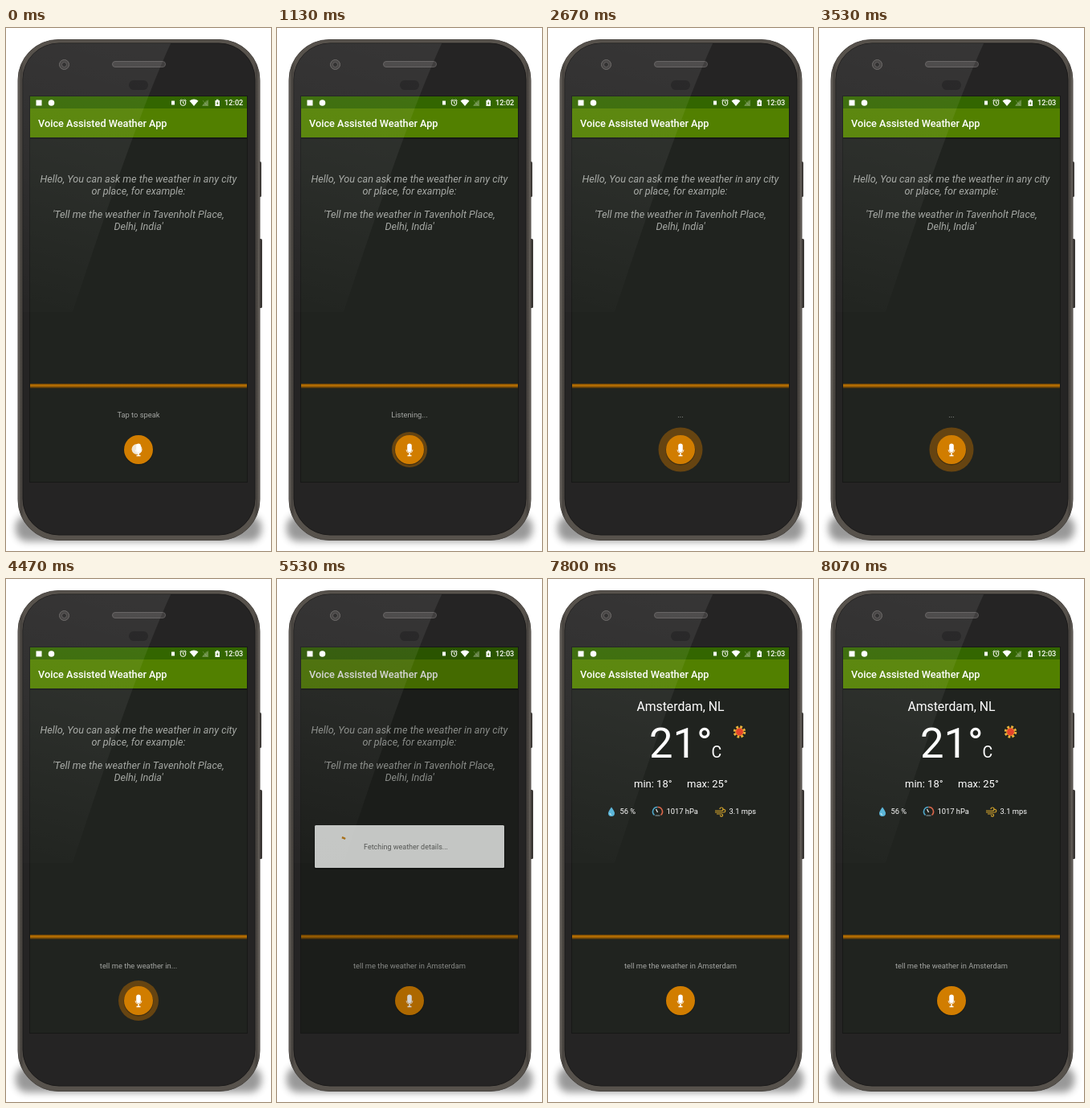
Recreate the animation shown at these times as an HTML page. Size 330 by 650 pixels, loop 8270 ms.

```html
<!DOCTYPE html>
<html lang="en">
<head>
<meta charset="utf-8">
<title>Voice weather demo</title>
<style>
html, body { margin: 0; width: 100%; height: 100%; overflow: hidden; background: #fff; }
svg { display: block; font-family: Roboto, "Noto Sans", sans-serif; }
.mid { text-anchor: middle; }
.small { font-size: 9.35px; }
</style>
</head>
<body>
<svg width="330" height="650" viewBox="0 0 330 650">
  <defs>
    <linearGradient id="rim" x1="0" y1="0" x2="1" y2="0">
      <stop offset="0" stop-color="#726d66"/><stop offset=".012" stop-color="#45413d"/>
      <stop offset=".025" stop-color="#57524c"/><stop offset=".975" stop-color="#57524c"/>
      <stop offset=".988" stop-color="#45413d"/><stop offset="1" stop-color="#726d66"/>
    </linearGradient>
    <linearGradient id="glare" gradientUnits="userSpaceOnUse" x1="150" y1="15" x2="60" y2="350">
      <stop offset="0" stop-color="#fff" stop-opacity=".08"/>
      <stop offset=".45" stop-color="#fff" stop-opacity=".055"/>
      <stop offset="1" stop-color="#fff" stop-opacity=".01"/>
    </linearGradient>
    <linearGradient id="line" x1="0" y1="0" x2="0" y2="1">
      <stop offset="0" stop-color="#5a3a0a"/><stop offset=".35" stop-color="#c47700"/>
      <stop offset=".65" stop-color="#8a5507"/><stop offset="1" stop-color="#252215"/>
    </linearGradient>
    <filter id="soft" x="-10%" y="-50%" width="120%" height="200%"><feGaussianBlur stdDeviation="5"/></filter>
    <clipPath id="face"><rect x="21" y="19" width="289" height="611" rx="45"/></clipPath>
  </defs>

  <!-- phone -->
  <rect x="12" y="606" width="306" height="32" rx="14" opacity=".4" filter="url(#soft)"/>
  <rect x="313" y="166" width="5" height="44" rx="1.5" fill="#3a3734"/>
  <rect x="313" y="262" width="6" height="86" rx="1.5" fill="#3a3734"/>
  <rect x="15" y="14.500" width="301" height="622" rx="50" fill="url(#rim)" stroke="#4a4642"/>
  <rect x="21" y="19" width="289" height="611" rx="45" fill="#252424" stroke="#1b1a1a"/>
  <rect x="132.500" y="41.500" width="66" height="7" rx="3.500" fill="#403e3e" stroke="#5c5959"/>
  <circle cx="72.500" cy="45.500" r="6" fill="#3b3938" stroke="#656261"/>
  <circle cx="72.500" cy="45.500" r="3" fill="#232222" stroke="#575454"/>
  <rect x="153" y="65" width="24" height="12" rx="6" fill="#191819"/>

  <!-- app -->
  <rect x="29" y="84" width="272" height="481" fill="#171817"/>
  <rect x="30" y="85" width="270" height="479" fill="#20231f"/>
  <rect x="30" y="85" width="270" height="15" fill="#336600"/>
  <rect x="30" y="100" width="270" height="36" fill="#528000"/>
  <rect x="30" y="136" width="270" height="2" fill="#151815"/>
  <text x="40" y="123" fill="#fff" font-size="12.7" font-weight="500">Voice Assisted Weather App</text>

  <g id="hello" class="mid" fill="#a5a8a4" font-size="12.65" font-style="italic">
    <text x="165" y="192">Hello, You can ask me the weather in any city</text>
    <text x="165" y="206.500">or place, for example:</text>
    <text x="165" y="236">'Tell me the weather in Tavenholt Place,</text>
    <text x="165" y="250.500">Delhi, India'</text>
  </g>

  <g id="result" fill="#fff">
    <text class="mid" x="165" y="163.500" font-size="15.8">Amsterdam, NL</text>
    <text x="126" y="222" font-size="52.600">21°</text>
    <text x="203.500" y="222" font-size="19.500">C</text>
    <text x="107" y="259" font-size="13">min: 18°</text>
    <text x="173" y="259" font-size="13">max: 25°</text>
    <text class="small" x="89.500" y="292">56 %</text>
    <text class="small" x="147.500" y="292">1017 hPa</text>
    <text class="small" x="225.500" y="292">3.1 mps</text>
    <circle cx="238.500" cy="190" r="6" fill="none" stroke="#e9b43b" stroke-width="3.500" stroke-dasharray="2.6 2.110"/>
    <circle cx="238.500" cy="190" r="4.800" fill="#e3432c" stroke="#ef8a2e"/>
    <path d="M79 283.500Q75 289 75 291A4 4 0 0 0 83 291Q83 289 79 283.500Z" fill="#58b4d8"/>
    <path d="M77 291a2 2 0 0 0 2 2" fill="none" stroke="#d5f0fa"/>
    <g fill="none" stroke-width="1.600">
      <path d="M132.500 293.500A5.700 5.700 0 0 1 136.500 283.500" stroke="#4fa5c8"/>
      <path d="M136.500 283.500A5.700 5.700 0 0 1 140.500 293.500" stroke="#d9674b"/>
      <path d="M136.500 290L134.500 286" stroke="#e8eef0" stroke-width="1.200"/>
      <path d="M133.500 294H139.500" stroke="#8fa3aa" stroke-width="1"/>
      <path d="M208 288H216a2 2 0 1 0-2-2M208 290H219a1.800 1.800 0 1 0-1.800-1.800M210 292H216a1.600 1.600 0 1 1-1.600 1.600" stroke="#d0a12c" stroke-width="1.200"/>
    </g>
  </g>

  <rect x="30" y="442" width="270" height="6" fill="url(#line)"/>
  <text id="prompt" class="mid small" x="165" y="484" fill="#a3a5a2"></text>
  <circle id="halo" cx="165" cy="524" fill="#664411"/>
  <circle cx="165" cy="525" r="18.500" fill="#101210" opacity=".4"/>
  <circle cx="165" cy="524" r="18" fill="#d17d00"/>
  <circle id="blob" cx="163" cy="523.500" r="6.500" fill="#f0e6d6"/>
  <rect x="162.200" y="516.500" width="5.600" height="10.500" rx="2.800" fill="#fff"/>
  <path d="M161 524a4 4 0 0 0 8 0" fill="none" stroke="#fff" opacity=".75"/>
  <path d="M165 528V531M162.500 531.500H167.500" stroke="#fff" stroke-width="1.400"/>

  <rect id="dim" x="30" y="85" width="270" height="479"/>
  <g id="dialog">
    <rect x="46" y="307" width="238" height="54" rx="2" opacity=".35"/>
    <rect x="47" y="306" width="236" height="53" rx="1.500" fill="#fdfffd"/>
    <text x="108" y="336" font-size="9" fill="#686a68">Fetching weather details...</text>
    <circle id="spin" cx="78.500" cy="332.500" r="11.500" fill="none" stroke="#d58a16" stroke-width="2.400" pathLength="1"/>
  </g>

  <!-- status bar -->
  <g fill="#fff">
    <rect x="37.500" y="89.500" width="7" height="7"/>
    <circle cx="56.500" cy="93" r="3.800"/>
    <rect x="206" y="90.500" width="4" height="5"/>
    <path d="M228.500 90.500Q234 86.500 239.500 90.500L234 97Z"/>
    <path d="M244 97L252 89V97Z" opacity=".28"/>
    <path d="M260.500 90H262V88.800H264.500V90H266V97H260.500Z"/>
    <path d="M264 91L262 94H263.200L262.600 96.300L264.700 93.200H263.500Z" fill="#336600"/>
    <g fill="none" stroke="#fff">
      <circle cx="220.500" cy="93" r="3.400"/>
      <path d="M220.500 91V93.200L222 94M216.500 90.500l2-1.700M224.500 90.500l-2-1.700"/>
      <path d="M245 90l5 6M250 90l-5 6" stroke-width=".7" opacity=".3"/>
    </g>
    <text id="clock" x="272" y="96.200" font-size="9.200" font-weight="500"></text>
  </g>
  <path d="M15 15H207Q165 104 83 353H15Z" fill="url(#glare)" clip-path="url(#face)"/>
</svg>
<script>
const LOOP = 8270, LISTEN = 600, SHOW = 5470, HIDE = 7400, FADE = 220;
const $ = id => document.getElementById(id);
const clamp = x => Math.max(0, Math.min(1, x));
const smooth = x => { x = clamp(x); return x * x * (3 - 2 * x); };
const fastOut = x => { x = clamp(x); return 1 - (1 - x) ** 2.4 * (1 + 1.4 * x); };

const prompts = [
  [0, 'Tap to speak'], [LISTEN, 'Listening...'], [2100, '...'],
  [3560, 'tell me...'], [3730, 'tell me the...'], [3930, 'tell me the weather...'],
  [4130, 'tell me the weather in...'], [5200, 'tell me the weather in Amsterdam']
];
// halo radius follows the voice level: [time, radius]
const levels = [
  [LISTEN, 18], [800, 28], [1130, 22], [1400, 28.5], [1700, 22], [2000, 28], [2300, 23],
  [2670, 27.5], [3000, 22], [3350, 27], [3700, 28], [4000, 23], [4250, 27], [4470, 25],
  [4650, 26.5], [4870, 0]
];

function level(t) {
  const i = levels.findIndex(p => p[0] > t);
  if (i < 1) return 0;
  const [t0, r0] = levels[i - 1], [t1, r1] = levels[i];
  return r0 + (r1 - r0) * smooth((t - t0) / (t1 - t0));
}

function spin(t) {
  const cycle = 1333, p = t % cycle / cycle;
  const head = .75 * fastOut(p * 2), tail = .75 * fastOut(p * 2 - 1);
  const turn = Math.floor(t / cycle) + p * .25 + t / 2222 - .25;
  const length = Math.max(.04, head - tail);
  $('spin').setAttribute('stroke-dasharray', `${length} ${1 - length}`);
  $('spin').setAttribute('transform', `rotate(${360 * (turn + tail)} 78.5 332.5)`);
}

function show(id, on) { $(id).style.display = on ? '' : 'none'; }

function draw(now) {
  const t = now % LOOP;
  $('prompt').textContent = prompts.filter(p => p[0] <= t).pop()[1];
  $('clock').textContent = t < 2200 ? '12:02' : '12:03';
  $('halo').setAttribute('r', level(t));
  show('blob', t < LISTEN);
  show('hello', t < HIDE);
  show('result', t >= HIDE);

  const k = Math.min(clamp((t - SHOW) / FADE), clamp((HIDE + FADE - t) / FADE));
  $('dim').style.opacity = .62 * k;
  $('dialog').style.opacity = clamp(k * 2.7);
  spin(Math.max(0, t - SHOW - 10));
}

const start = performance.now();
function frame() {
  draw(performance.now() - start);
  requestAnimationFrame(frame);
}
draw(0);
requestAnimationFrame(frame);
</script>
</body>
</html>
```
